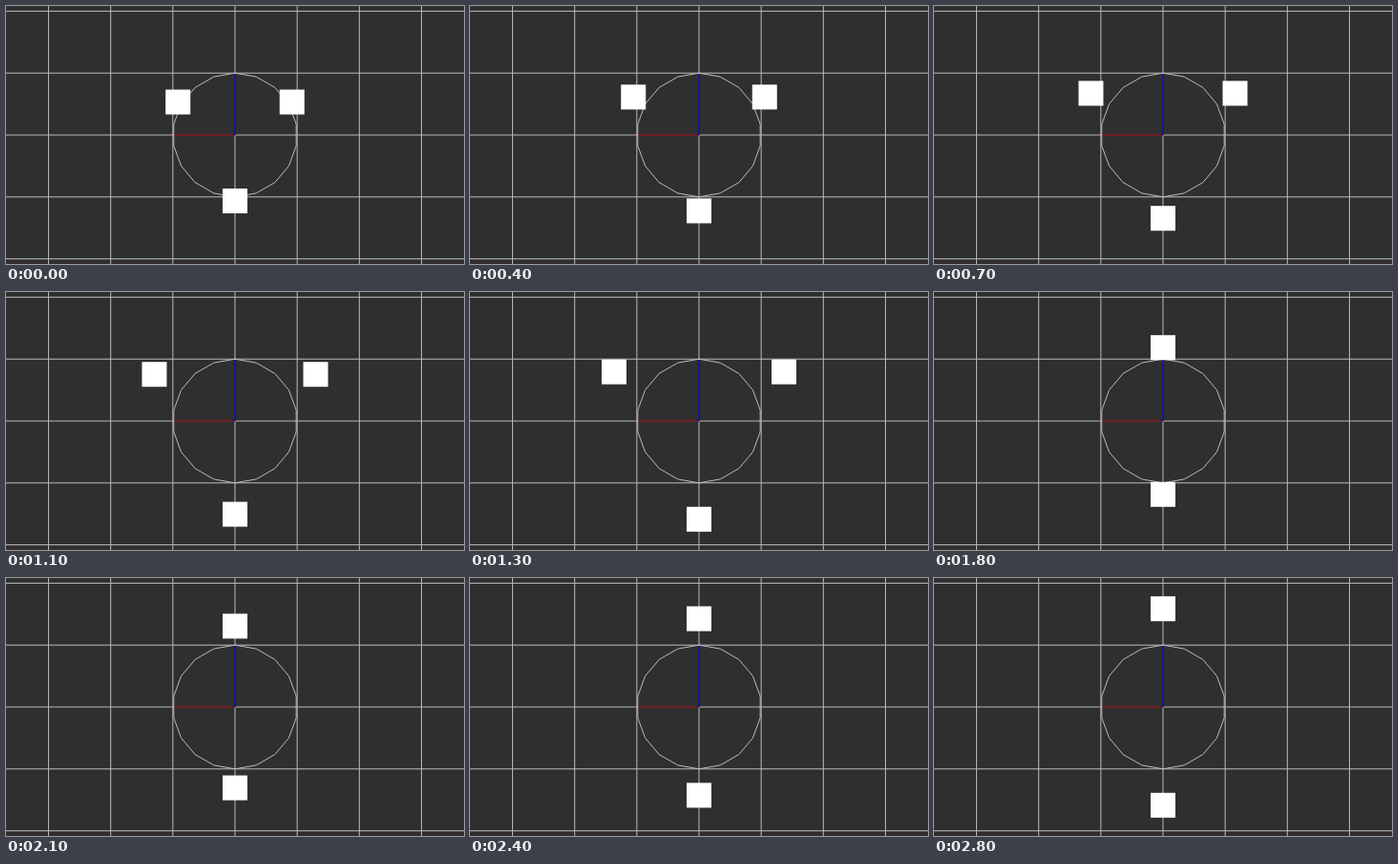
An HTML page with a canvas that plays this animation: 480 by 270 pixels, repeating every 2.9 s.

```html
<!DOCTYPE html>
<html lang="en">
<head>
<meta charset="utf-8">
<title>Burst patterns</title>
<style>
  html, body { margin: 0; width: 100%; height: 100%; overflow: hidden; background: #2f2f2f; }
  canvas { display: block; width: 480px; height: 270px; }
</style>
</head>
<body>
<canvas id="stage" width="480" height="270"></canvas>
<script>
const ctx = document.getElementById('stage').getContext('2d');
const CX = 240, CY = 135, CELL_X = 65.15, CELL_Y = 64.8, SIZE = 26;
const STEP = 100, LOOP = 2900;
const START = 69, SPEED = 2.6, REACH = 104.3;
const BACK = '#2f2f2f', LINE = '#bcbcbc';

// Each burst: first step and the directions in degrees, clockwise from right.
const bursts = [
  { from: 0, angles: [90, 210, 330] },
  { from: 15, angles: [90, 270] }
];

function rect(color, x, y, w, h) {
  ctx.fillStyle = color;
  ctx.fillRect(x, y, w, h);
}

function drawScene() {
  rect(BACK, 0, 0, 480, 270);
  rect('#3a292d', 0, 269, 480, 1);
  for (let i = -3; i <= 3; i++) rect(LINE, CX + i * CELL_X - 0.5, 0, 1, 270);
  for (let i = -2; i <= 2; i++) rect(LINE, 0, CY + i * CELL_Y - 0.5, 480, 1);

  // Coloured axes take the place of the grid lines inside the ring.
  rect(BACK, 176, CY - 1, CX - 176, 2);
  rect(BACK, CX - 1, 71, 2, CY - 71);
  rect('#7c1c24', 176, CY - 0.8, CX - 176, 1.6);
  rect('#1010a8', CX - 0.8, 71, 1.6, CY - 71);

  ctx.beginPath();
  for (let i = 0; i < 18; i++) {
    const a = i * Math.PI / 9;
    ctx.lineTo(CX + CELL_X * Math.sin(a), CY - CELL_Y * Math.cos(a));
  }
  ctx.closePath();
  ctx.strokeStyle = LINE;
  ctx.lineWidth = 1;
  ctx.stroke();
}

function drawBurst(step) {
  const burst = bursts[step < bursts[1].from ? 0 : 1];
  const r = Math.min(REACH, START + SPEED * (step - burst.from));
  for (const deg of burst.angles) {
    const a = deg * Math.PI / 180;
    rect('#fff', CX + r * Math.cos(a) - SIZE / 2, CY + r * Math.sin(a) - SIZE / 2, SIZE, SIZE);
  }
}

const begin = performance.now();
function frame() {
  const time = (performance.now() - begin) % LOOP;
  drawScene();
  drawBurst(Math.floor(time / STEP));
  requestAnimationFrame(frame);
}
frame();
</script>
</body>
</html>
```
